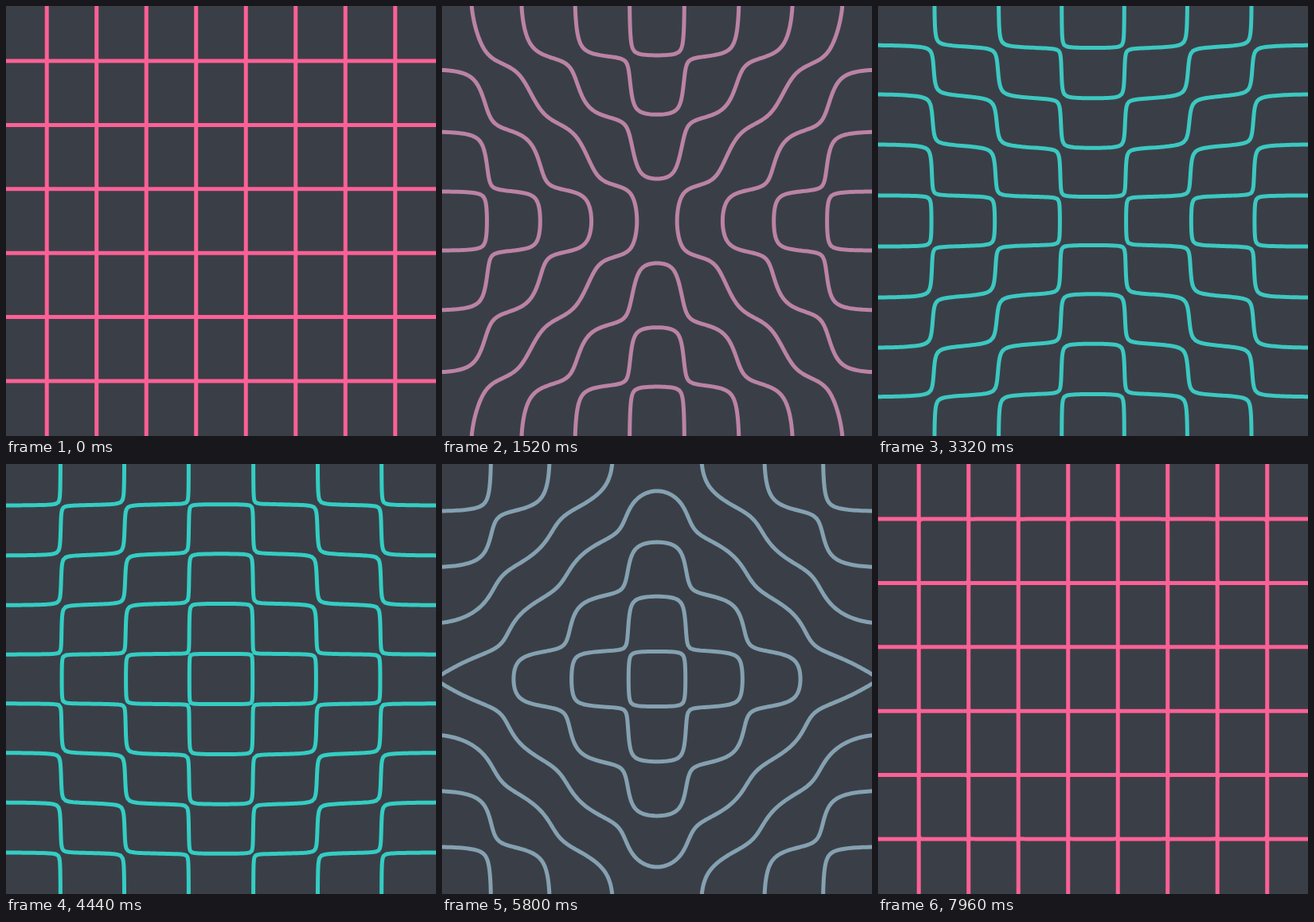
An HTML page with a canvas for the animation above (8000 ms loop, 540x540 px).

```html
<!DOCTYPE html>
<html>
<head>
<meta charset="utf-8">
<title>Nodal lines</title>
<style>
  html, body { margin: 0; width: 100%; height: 100%; overflow: hidden; background: #3a3f47; }
  canvas { display: block; }
</style>
</head>
<body>
<canvas id="stage" width="540" height="540"></canvas>
<script>
const ctx = document.getElementById('stage').getContext('2d');
const SIZE = 540, STEP = 3, N = SIZE / STEP;
const PLATE = 562.5;            // plate is slightly larger than the stage
const LOOP = 8000, FRAME = 40;
const PINK = [252, 96, 150], TEAL = [46, 208, 196];

// Standing wave sampled along one axis
const wave = n => Float64Array.from({ length: N + 1 },
  (_, i) => Math.cos(n * Math.PI * (i * STEP - SIZE / 2) / PLATE));
const c7 = wave(7), c9 = wave(9);
const field = new Float64Array((N + 1) * (N + 1));

function fillField(theta) {
  const a = Math.cos(theta), b = Math.sin(theta);
  for (let j = 0, k = 0; j <= N; j++)
    for (let i = 0; i <= N; i++)
      field[k++] = a * c9[i] * c7[j] - b * c7[i] * c9[j];
}

// Marching squares along the zero level
function traceCell(i, j) {
  const k = j * (N + 1) + i;
  const v = [field[k], field[k + 1], field[k + N + 2], field[k + N + 1]];
  const up = v.map(q => q > 0);
  const x = i * STEP, y = j * STEP;
  const cut = (p, q) => STEP * v[p] / (v[p] - v[q]);
  const pts = [];
  if (up[0] !== up[1]) pts.push([x + cut(0, 1), y]);
  if (up[1] !== up[2]) pts.push([x + STEP, y + cut(1, 2)]);
  if (up[2] !== up[3]) pts.push([x + cut(3, 2), y + STEP]);
  if (up[3] !== up[0]) pts.push([x, y + cut(0, 3)]);
  if (!pts.length) return;
  // With four cuts, the cell's middle decides which corners connect
  if (pts.length === 4 && (v[0] + v[1] + v[2] + v[3] > 0) !== up[0]) pts.unshift(pts.pop());
  for (let n = 0; n < pts.length; n += 2) {
    ctx.moveTo(...pts[n]);
    ctx.lineTo(...pts[n + 1]);
  }
}

const ease = p => (1 - Math.cos(Math.PI * p)) / 2;

function draw(now) {
  const t = Math.floor(now % LOOP / FRAME) * FRAME;
  const phase = t / (LOOP / 2), half = Math.floor(phase);
  fillField(Math.PI / 2 * (half + ease(phase - half)));

  const mix = ease(phase);
  ctx.fillStyle = '#3a3f47';
  ctx.fillRect(0, 0, SIZE, SIZE);
  ctx.strokeStyle = `rgb(${PINK.map((c, n) => Math.round(c + (TEAL[n] - c) * mix))})`;
  ctx.lineWidth = 5;
  ctx.lineCap = 'round';
  ctx.beginPath();
  for (let j = 0; j < N; j++)
    for (let i = 0; i < N; i++) traceCell(i, j);
  ctx.stroke();
}

const start = performance.now();
function loop() {
  draw(performance.now() - start);
  requestAnimationFrame(loop);
}
loop();
</script>
</body>
</html>
```
